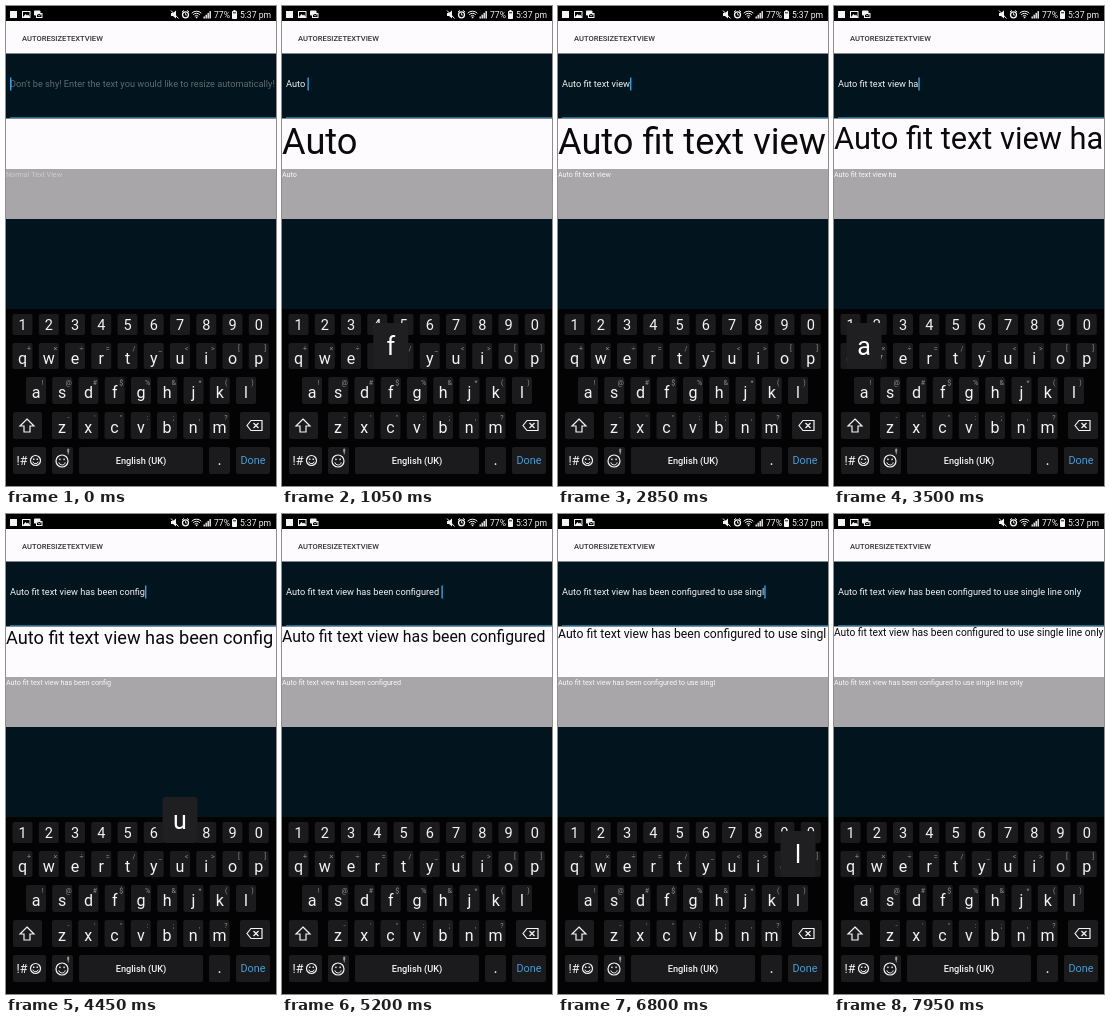
An HTML page with a canvas that plays this animation: 270x480 px, repeating every 8 s.

```html
<!DOCTYPE html>
<html lang="en">
<head>
<meta charset="utf-8">
<title>Auto-resizing text view</title>
<style>
html, body { margin: 0; width: 100%; height: 100%; overflow: hidden; background: #000; }
canvas { display: block; width: 270px; height: 480px; }
</style>
</head>
<body>
<canvas id="stage"></canvas>
<script>
const W = 270, H = 480, LOOP = 8000;
const canvas = document.getElementById('stage');
const ctx = canvas.getContext('2d');
const dpr = window.devicePixelRatio || 1;
canvas.width = W * dpr;
canvas.height = H * dpr;

const FONT = 'Roboto, "Noto Sans", sans-serif';
const KEY = '#1b1b1d', INK = '#f4f4f4', BLUE = '#3a9fd8';

// Typing bursts: start, gap between keys, keys ("<" deletes)
const bursts = [
  [300, 130, 'Auto '], [1100, 130, 'fit ye'], [1950, 100, '<<'],
  [2360, 50, 'text view'], [3060, 0, ' '], [3300, 170, 'ha'], [3600, 0, 's'],
  [3670, 65, ' been config'], [4500, 70, 'ur'], [4760, 140, 'ed'], [5100, 0, ' '],
  [5410, 340, 'to'], [6050, 0, ' '], [6260, 63, 'use singl'],
  [6880, 60, 'e '], [7110, 62.5, 'line only']
];
const presses = bursts.flatMap(([start, gap, keys]) =>
  [...keys].map((key, i) => ({ key, at: start + i * gap })));

const LEAD = 60, LINGER = 90, BLINK = 340;

// Keyboard rows: letters, corner symbols, first centre, top, height
const rows = [
  ['1234567890', '', 16.5, 308, 21],
  ['qwertyuiop', '+×÷=/_<>[]', 16.5, 337, 26],
  ['asdfghjkl', '!@#$%&*()', 30, 371, 27],
  ['zxcvbnm', '-\'":;,?', 56, 406, 27]
];
const PITCH = 26.25;
const keyAt = {};
for (const [letters, , x0, top] of rows)
  [...letters].forEach((c, i) => { keyAt[c] = { x: x0 + i * PITCH, top }; });

function rect(x, y, w, h, fill) {
  ctx.fillStyle = fill;
  ctx.fillRect(x, y, w, h);
}

function round(x, y, w, h, r, fill) {
  ctx.fillStyle = fill;
  ctx.beginPath();
  ctx.roundRect(x, y, w, h, r);
  ctx.fill();
}

function text(s, x, y, size, color, align = 'left', weight = 400) {
  ctx.font = `${weight} ${size}px ${FONT}`;
  ctx.textAlign = align;
  ctx.fillStyle = color;
  ctx.fillText(s, x, y);
}

function widthOf(s, size) {
  ctx.font = `400 ${size}px ${FONT}`;
  return ctx.measureText(s).width;
}

function path(points, close, color = INK, width = 1.2, fill = false) {
  ctx.beginPath();
  points.forEach(([x, y], i) => i ? ctx.lineTo(x, y) : ctx.moveTo(x, y));
  if (close) ctx.closePath();
  ctx.lineWidth = width;
  ctx.strokeStyle = ctx.fillStyle = color;
  fill ? ctx.fill() : ctx.stroke();
}

function arc(x, y, r, from = 0, to = Math.PI * 2, width = 1.2) {
  ctx.beginPath();
  ctx.arc(x, y, r, from, to);
  ctx.lineWidth = width;
  ctx.strokeStyle = INK;
  ctx.stroke();
}

function smiley(x, y, r) {
  arc(x, y, r);
  arc(x, y + r * 0.1, r * 0.55, 0.25, Math.PI - 0.25, 1);
  for (const s of [-1, 1]) rect(x + s * r * 0.35 - 0.7, y - r * 0.4, 1.4, 1.5, INK);
}

function statusBar() {
  rect(0, 0, W, 15, '#000');
  rect(4, 5, 7, 7, INK);
  ctx.lineWidth = 1;
  ctx.strokeStyle = INK;
  ctx.strokeRect(16.5, 5.5, 7.5, 6);
  path([[17, 11], [19.5, 8], [21, 9.5], [22, 8.5], [24, 11]], true, INK, 1, true);
  round(28, 4.5, 6.5, 5, 1, INK);
  round(30, 7, 6.5, 5, 1, '#000');
  ctx.strokeRect(30.5, 7.5, 5.5, 4);
  path([[30.5, 7.5], [33.2, 9.8], [36, 7.5]], false, INK, 0.8);

  path([[165, 7], [167, 7], [170, 4.5], [170, 12.5], [167, 10], [165, 10]], true, INK, 1, true);
  path([[165, 4.5], [172.5, 12.5]], false, INK, 1);
  arc(179.5, 8.8, 3, 0, 7, 1.3);
  path([[179.5, 7], [179.5, 9], [181, 9]], false, INK, 0.8);
  path([[176, 6], [178, 4.4]], false, INK, 1);
  path([[181, 4.4], [183, 6]], false, INK, 1);
  for (const r of [2.5, 4.7, 6.8]) arc(190.5, 12, r, -Math.PI * 0.75, -Math.PI * 0.25, 1);
  rect(189.8, 10.7, 1.5, 1.5, INK);
  for (let i = 0; i < 4; i++) rect(197.5 + i * 2, 10.5 - i * 1.8, 1.4, 2 + i * 1.8, INK);
  text('77%', 208, 12.2, 8.6, INK);
  round(226, 5, 5, 8, 0.8, INK);
  rect(227.5, 4, 2, 1.2, INK);
  rect(227, 6, 3, 1.4, '#555');
  text('5:37 pm', 265, 12.2, 8.6, INK, 'right');
}

function keyboard() {
  rect(0, 303, W, 177, '#030304');
  rows.forEach(([letters, marks, x0, top, h], row) => {
    [...letters].forEach((c, i) => {
      const x = x0 + i * PITCH;
      round(x - 10, top, 20, h, 2, KEY);
      text(c, x, row ? top + 20.5 : top + 15.5, row ? 16 : 14.5, INK, 'center');
      if (marks) text(marks[i], x + 6.5, top + 8, 7, '#8d8d8f', 'center');
    });
  });

  round(7, 406, 29, 27, 2, KEY);
  path([[21, 413], [28, 420], [24, 420], [24, 426], [18, 426], [18, 420], [14, 420]], true);
  round(234, 406, 30, 27, 2, KEY);
  path([[241, 419.5], [245, 414.5], [256, 414.5], [256, 424.5], [245, 424.5]], true);
  path([[247.5, 417], [252.5, 422]], false);
  path([[252.5, 417], [247.5, 422]], false);

  for (const [x, w] of [[7, 33], [46, 21], [73, 124], [203, 21], [230, 34]])
    round(x, 441, w, 27, 2, KEY);
  text('!#', 10.5, 458.5, 12.5, INK);
  smiley(29.5, 454.5, 5);
  smiley(56, 455, 6);
  round(61.2, 442.5, 2, 4, 1, '#999');
  rect(61.8, 446, 0.9, 2.4, '#999');
  text('English (UK)', 135, 457.5, 9.2, INK, 'center', 500);
  text('.', 213.5, 458.5, 16, INK, 'center');
  text('Done', 247, 458, 10.8, '#4a9bd0', 'center');
}

function popup(key) {
  const spot = keyAt[key.toLowerCase()];
  if (!spot) return;
  const top = spot.top - 54;
  round(spot.x - 17.5, top, 35, 46, 3, '#1f1f21');
  text(key, spot.x, top + 32, 25, '#fff', 'center');
}

// Largest size that keeps the line inside the view
function fitSize(s) {
  const room = W / (widthOf(s, 100) / 100);
  return Math.min(36.2, Math.floor(room * 5) / 5);
}

function stateAt(t) {
  let value = '', last = BLINK - 640 + 10, active = '';
  for (const { key, at } of presses) {
    if (at <= t) {
      value = key === '<' ? value.slice(0, -1) : value + key;
      last = at;
    }
    if (t >= at - LEAD && t < at + LINGER) active = key;
  }
  return { value, active, caret: t - last < BLINK };
}

function draw(t) {
  const { value, active, caret } = stateAt(t);
  ctx.setTransform(dpr, 0, 0, dpr, 0, 0);
  rect(0, 0, W, H, '#02141d');
  statusBar();

  rect(0, 15, W, 32.5, '#fdfbfd');
  text('AUTORESIZETEXTVIEW', 16, 34.7, 7.6, '#333', 'left', 500);

  text(value || "Don't be shy! Enter the text you would like to resize automatically!",
    4, 81.3, 9.2, value ? INK : '#5f6c73');
  if (caret) rect(4 + widthOf(value, 9.2), 71.5, 1.4, 13, BLUE);
  rect(4, 111, 266, 1.2, '#1f6c90');

  rect(0, 112.5, W, 51, '#fdfbfd');
  if (value) {
    const size = fitSize(value);
    text(value, 0, 112.5 + size * 0.98, size, '#0a0a0a');
  }
  rect(0, 163, W, 50, '#a8a6a8');
  text(value || 'Normal Text View', 0, 171, 7.15, value ? '#fafafa' : '#cdcbcd');

  keyboard();
  if (active) popup(active);
}

function frame(now) {
  draw(now % LOOP);
  requestAnimationFrame(frame);
}
requestAnimationFrame(frame);
</script>
</body>
</html>
```
